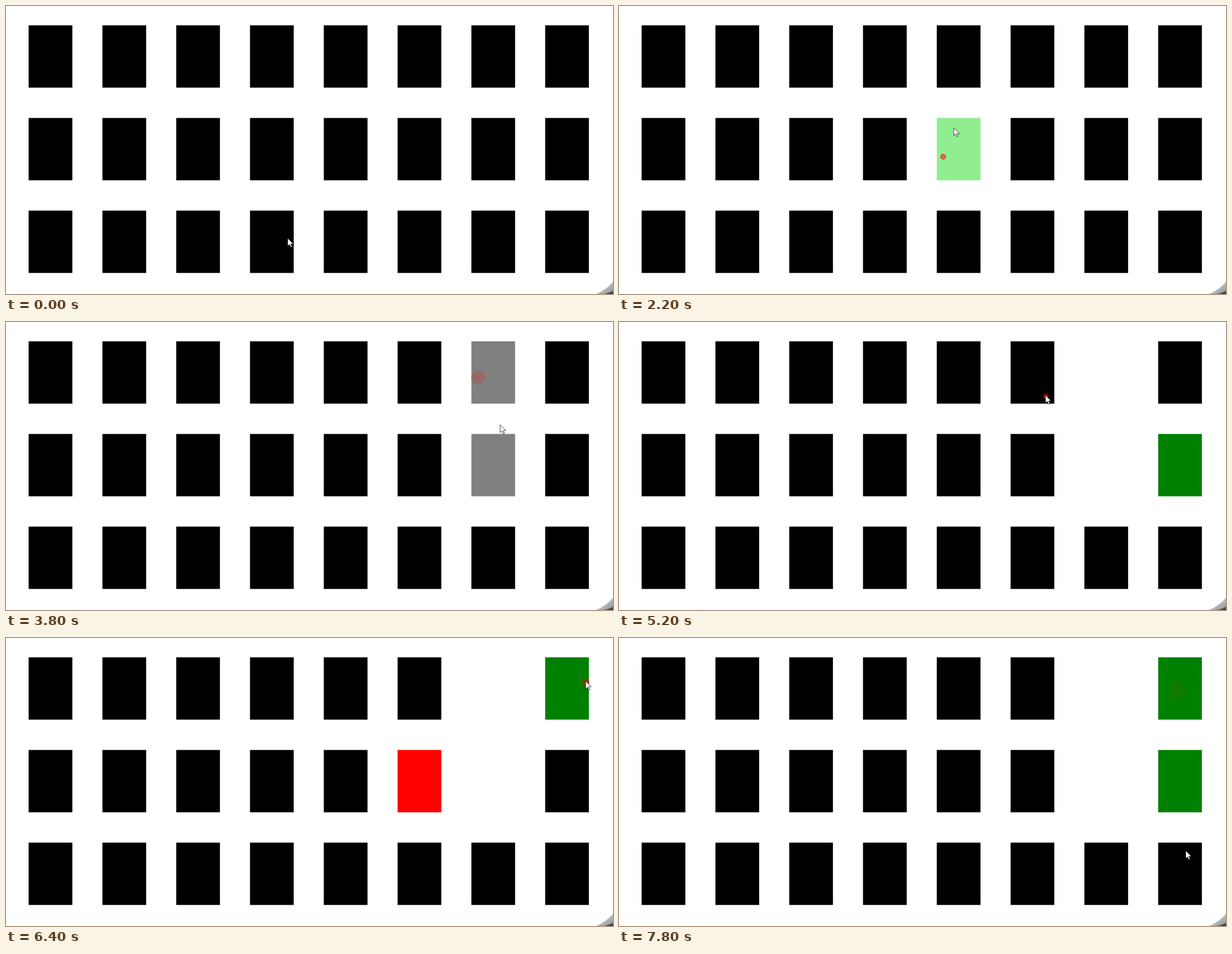
Recreate the animation shown at these times as an HTML page with a canvas. Size 1086x516 px, loop 8000 ms.

```html
<!DOCTYPE html>
<html lang="en">
<head>
<meta charset="utf-8">
<title>Card pairs</title>
<style>
  html, body { margin: 0; width: 100%; height: 100%; overflow: hidden; background: #fff; }
  canvas { display: block; }
</style>
</head>
<body>
<canvas id="stage" width="1086" height="516"></canvas>
<script>
const ctx = document.getElementById('stage').getContext('2d');
const LOOP = 8000, STEP = 200;
const COLS = 8, ROWS = 3;
const LEFT = 40.5, TOP = 34.6, PITCH_X = 132.02, PITCH_Y = 166, CARD_W = 78.2, CARD_H = 111.7;
const FLIP_DELAY = 40, DWELL = 100, RIPPLE_LIFE = 460;

// Hidden colours of the cards that get opened, by row and column
const hidden = [
  { 4: 'yellow', 5: 'blue', 6: 'gray', 7: 'green' },
  { 4: 'lightgreen', 5: 'red', 6: 'gray', 7: 'green' }
];

const point = (t, x, y) => ({ t, x, y });

const clicks = [
  point(900, 718, 258), point(1300, 716, 106),
  point(2140, 580, 270), point(2500, 626, 108),
  point(3300, 851, 238), point(3500, 844.5, 99.5),
  point(4100, 984.5, 257), point(5170, 763.5, 133),
  point(5700, 735, 250), point(6300, 1037.5, 79),
  point(6900, 1005, 242), point(7350, 999.5, 95)
];

// Places where the pointer turns between clicks
const turns = [
  point(0, 504, 416), point(1200, 690, 141), point(1800, 579, 268),
  point(2200, 599, 218), point(3800, 884, 184), point(4800, 975, 270),
  point(7800, 1014, 381), point(LOOP, 1014, 381)
];

const route = clicks
  .map(c => point(c.t, c.x - 0.5, c.y - 2))
  .concat(turns)
  .sort((a, b) => a.t - b.t);

const smooth = k => k * k * (3 - 2 * k);
const clamp = k => Math.min(1, Math.max(0, k));

function cardUnder({ x, y }) {
  const col = Math.floor((x - LEFT) / PITCH_X);
  const row = Math.floor((y - TOP) / PITCH_Y);
  return { col, row, color: hidden[row][col] };
}

// A new turn closes the open pair, or removes it when the colours match
function playUntil(t) {
  let open = [];
  const gone = [];
  for (const c of clicks) {
    if (c.t + FLIP_DELAY > t) break;
    if (open.length === 2) {
      if (open[0].color === open[1].color) gone.push(...open);
      open = [];
    }
    open.push(cardUnder(c));
  }
  return { open, gone };
}

function drawCards(t) {
  const { open, gone } = playUntil(t);
  for (let row = 0; row < ROWS; row++) {
    for (let col = 0; col < COLS; col++) {
      const here = card => card.col === col && card.row === row;
      if (gone.some(here)) continue;
      const face = open.find(here);
      ctx.fillStyle = face ? face.color : '#000';
      ctx.fillRect(LEFT + col * PITCH_X, TOP + row * PITCH_Y, CARD_W, CARD_H);
    }
  }
}

function cornerShape(x, y, bend, fill) {
  ctx.beginPath();
  ctx.moveTo(x, 516);
  ctx.quadraticCurveTo((x + 1086) / 2 + 3, (516 + y) / 2 + bend, 1086, y);
  ctx.lineTo(1086, 516);
  ctx.fillStyle = fill;
  ctx.fill();
}

function drawCorner() {
  const shade = ctx.createLinearGradient(1066, 500, 1080, 520);
  shade.addColorStop(0, '#ccd0d2');
  shade.addColorStop(1, '#8a9194');
  cornerShape(1056, 494, 3, shade);
  cornerShape(1069, 510, 1, '#414749');
}

function drawRipple(t, c) {
  const age = t - c.t;
  if (age < 0 || age > RIPPLE_LIFE) return;
  const alpha = Math.max(0.06, 0.6 - age * 0.0014);
  ctx.beginPath();
  ctx.arc(c.x, c.y, 2.8 + age * 0.031, 0, Math.PI * 2);
  ctx.fillStyle = `rgba(255,0,0,${alpha})`;
  ctx.fill();
  ctx.strokeStyle = `rgba(255,0,0,${Math.max(0, 0.9 - age * 0.0025)})`;
  ctx.lineWidth = 1;
  ctx.stroke();
}

function pointerAt(t) {
  const i = route.findIndex(p => p.t > t);
  const a = route[i - 1], b = route[i];
  const k = smooth(clamp((t - a.t - DWELL) / (b.t - a.t - DWELL)));
  return [a.x + (b.x - a.x) * k, a.y + (b.y - a.y) * k];
}

const arrow = new Path2D('M0 0V14.2L3.3 11.2L5.7 16.3L7.9 15.3L5.6 10.4H10Z');

function drawPointer(t) {
  ctx.save();
  ctx.translate(...pointerAt(t));
  ctx.fillStyle = '#fff';
  ctx.fill(arrow);
  ctx.strokeStyle = '#000';
  ctx.lineWidth = 0.75;
  ctx.stroke(arrow);
  ctx.restore();
}

function draw(now) {
  const t = Math.floor((now % LOOP) / STEP) * STEP;
  ctx.fillStyle = '#fff';
  ctx.fillRect(0, 0, 1086, 516);
  drawCards(t);
  drawCorner();
  clicks.forEach(c => drawRipple(t, c));
  drawPointer(t);
}

const begin = performance.now();
function tick() {
  draw(performance.now() - begin);
  requestAnimationFrame(tick);
}
tick();
</script>
</body>
</html>
```
